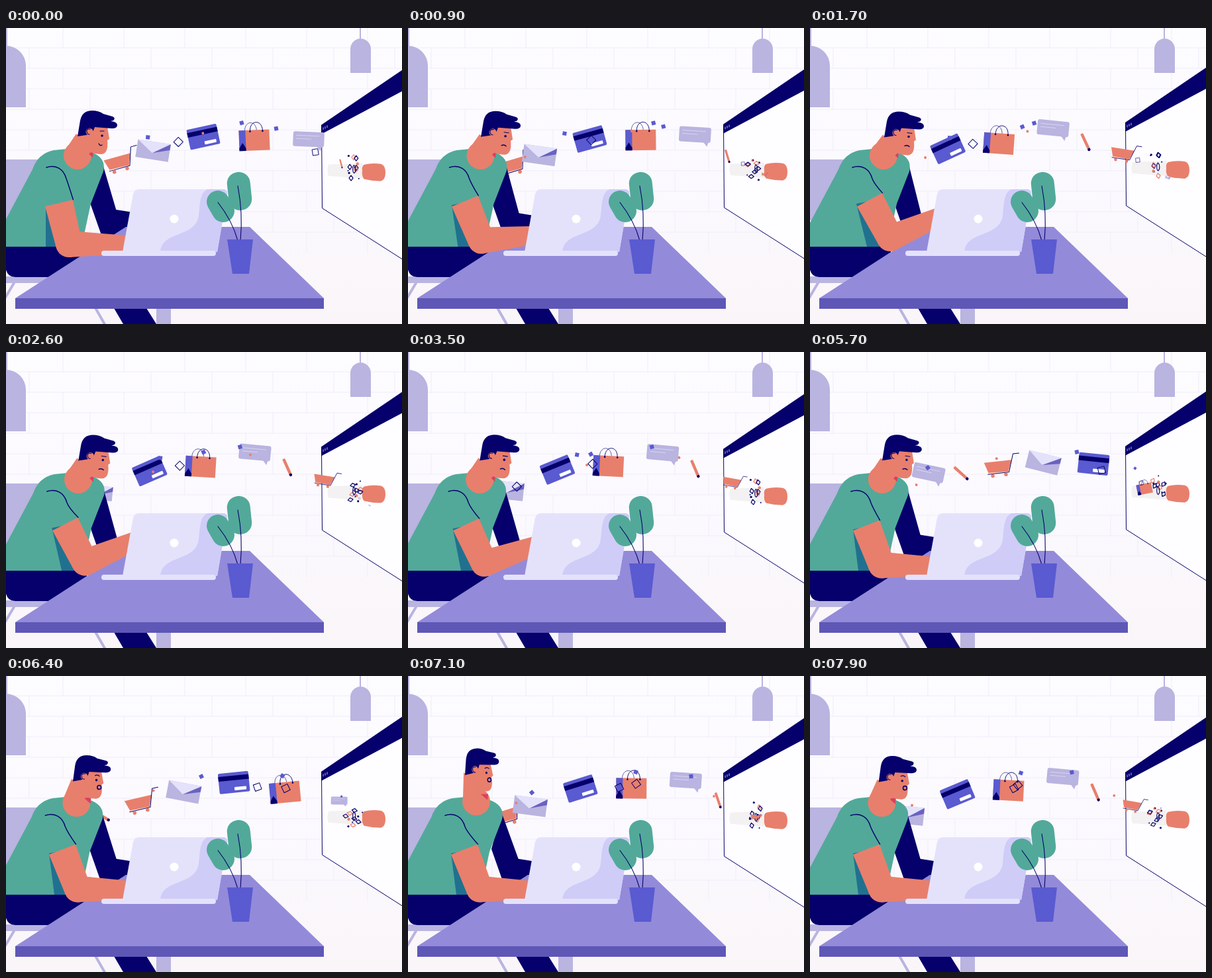
Write an HTML page with a canvas that moves like this. It is 598 px wide and 448 px high and loops after 8 s.

```html
<!DOCTYPE html>
<html lang="en">
<head>
<meta charset="utf-8">
<title>Online shopping at the desk</title>
<style>
html, body { margin: 0; width: 100%; height: 100%; overflow: hidden; background: #fcfbff; }
canvas { display: block; }
</style>
</head>
<body>
<canvas id="stage" width="598" height="448"></canvas>
<script>
const ctx = document.getElementById('stage').getContext('2d');
const LOOP = 8, STEP = .1;          // seconds
const SPEED = 463, RING = 408;      // px per second, length of one train of items
const TAU = Math.PI * 2;
const C = {
  navy: '#05006b', coral: '#e87f6c', teal: '#52a999', lilac: '#b9b4e0', pale: '#e4e2fb',
  shade: '#cfccf8', blue: '#5a5ad1', table: '#938bd9', front: '#5e57b6', white: '#fff'
};

const clamp = v => Math.max(0, Math.min(1, v));
const smooth = v => { v = clamp(v); return v * v * (3 - 2 * v); };

// Motion rules
const shake = t => -2.2 * (1 - Math.cos(TAU * (t - .3) / 3.5));
const nod = t => .5 + .5 * Math.cos(TAU * (t - 1.65) / 3.1);
const lookUp = t => Math.exp(-(((t - 7.15) / .7) ** 2));
const armLift = t => smooth(t / 1.6) * (1 - .5 * smooth((t - 1.7) / 3.8));
const trainX = t => 237 + SPEED * t + 61 * clamp(1 - t / 1.7);
const arcY = x => 164 + (x - 360) ** 2 * (x < 360 ? .00095 : .0018);
const wrap = x => 110 + (((x - 110) % RING) + RING) % RING;
const size = x => clamp((x - 128) / 16) * clamp(1 - (x - 455) / 100);

function randomizer(seed) {
  return () => (seed = (seed * 16807) % 2147483647) / 2147483647;
}

// Drawing helpers
function fill(d, color) { ctx.fillStyle = color; ctx.fill(new Path2D(d)); }
function line(d, color = C.navy, w = 1.1) {
  ctx.strokeStyle = color; ctx.lineWidth = w; ctx.lineCap = ctx.lineJoin = 'round';
  ctx.stroke(new Path2D(d));
}
function rect(x, y, w, h, color, r = 0) {
  ctx.fillStyle = color; ctx.beginPath(); ctx.roundRect(x, y, w, h, r); ctx.fill();
}
function dot(x, y, r, color) {
  ctx.fillStyle = color; ctx.beginPath(); ctx.arc(x, y, r, 0, TAU); ctx.fill();
}
function at(x, y, deg, scale, draw) {
  ctx.save(); ctx.translate(x, y); ctx.rotate(deg * Math.PI / 180); ctx.scale(scale, scale);
  draw(); ctx.restore();
}

function room() {
  const g = ctx.createLinearGradient(0, 0, 0, 448);
  g.addColorStop(0, '#fdfcff'); g.addColorStop(.6, '#fbf9fe'); g.addColorStop(1, '#faf5f8');
  ctx.fillStyle = g; ctx.fillRect(0, 0, 598, 448);
  let d = '';
  for (let row = 0; row < 11; row++) {
    const y = row * 31 - 1;
    d += `M0 ${y}H598`;
    for (let x = row % 2 ? 35 : 86; x < 598; x += 92) d += `M${x} ${y}v31`;
  }
  line(d, '#efedf9', 1);
  line('M1 0V30M535 0V18', C.lilac, 2);
  fill('M-30 120V57A30 30 0 0 1 30 57V120Z', C.lilac);
  fill('M520 68V32A15.5 16 0 0 1 551 32V68Z', C.lilac);
}

function screen(t) {
  fill('M476 147L598 64V350L478 273Z', '#fefdff');
  fill('M476 147L598 64V96L476 161Z', C.navy);
  line('M476.500 148L477.500 273L598 350', C.navy, 1);
  line('M479 151v3M482 149.500v3M485 148v3', C.lilac, 1);
  fill('M487 207L538 205V228L487 224Q484 216 487 207Z', '#f3f1f1');
  fill('M541 207Q553 204 566 206Q573 208 573 219Q573 230 566 232Q553 232 541 229Q537 226 538 216Q537 209 541 207Z', C.coral);
  crumbs(t);
}

// Crumbs circle in front of the nozzle, each at its own pace.
function crumbs(t) {
  for (let i = 0; i < 11; i++) {
    const angle = i * 2.4 + TAU * t / 3.5 * (1 + i % 3);
    const radius = 7 + i % 4 * 4.5;
    const x = 524 + Math.cos(angle) * radius * .7, y = 212 + Math.sin(angle) * radius;
    const color = i % 3 === 2 ? C.coral : C.navy;
    if (i % 2) dot(x, y, 1 + i % 3 * .6, color);
    else at(x, y, t * 100, 1, () => line('M0 -4L3 0L0 4L-3 0Z', color, 1.2));
  }
  line('M525.500 208C528 210 529 217 526 220C523 219 523 210 525.500 208');
}

const DRAW = {
  card() {
    rect(-23, -15.5, 46, 31, C.blue, 2);
    rect(-23, -10.5, 46, 7, C.navy);
    rect(0, 7, 18, 5, C.white, 1);
  },
  bag() {
    line('M-14 -15C-13 -30 3 -30 4 -15', C.navy, .6);
    rect(-23, -15, 46, 31, C.coral);
    fill('M-23 -15H-13V16H-23Z', C.blue);
    fill('M-23 16V12L-18 4L-13 12V16Z', C.navy);
    line('M-6 -14C-6 -31 13 -31 13 -14', C.navy, .9);
    dot(-6, -13, 1.3, C.navy); dot(13, -13, 1.3, C.navy);
  },
  chat() {
    rect(-24, -12, 48, 23, C.lilac, 3);
    fill('M12 9H21L19 17Z', C.lilac);
    line('M-19 -6H16M-19 -1H4', '#d8d5f0', 1);
  },
  pencil() {
    rect(-14, -2.2, 26, 4.4, C.coral, 1);
    dot(12.5, 0, 2.2, C.navy);
  },
  cart() {
    fill('M-20 -4L22 -4L15 13L-15 12Z', C.coral);
    line('M-16 14L16 14L25 -13L34 -13', C.navy, 1);
    dot(-9, 17, 2.8, C.coral); dot(11, 17, 2.8, C.coral);
  },
  mail() {
    rect(-25, -14, 50, 27, C.lilac);
    fill('M25 -14L0 3L25 -5Z', '#6a62bf');
    fill('M-25 -14H25L-1 3Z', C.pale);
  },
  solid() { rect(-3, -3, 6, 6, C.blue); },
  hollow() { line('M-5 -5H5V5H-5Z', C.navy, 1); },
  red() { dot(0, 0, 2, C.coral); }
};

// off: place in the train, lift: height from the arc, rot: angle at x = 300,
// turn: degrees per px, lag: how far it trails when leaving the head
const ITEMS = [
  { kind: 'cart', off: -145, lift: 0, rot: -5, turn: .08, lag: .4 },
  { kind: 'mail', off: -76, lift: 4, rot: 12, turn: .04, lag: 0 },
  { kind: 'card', off: 0, lift: -3, rot: -12, turn: .14, lag: 0 },
  { kind: 'bag', off: 77, lift: 5, rot: 3, turn: -.07, lag: 0 },
  { kind: 'chat', off: 159, lift: -12, rot: 8, turn: -.035, lag: 0 },
  { kind: 'pencil', off: 208, lift: 3, rot: 51, turn: .12, lag: 0 }
];

const rnd = randomizer(77);
const BITS = Array.from({ length: 7 }, (_, i) => ({
  kind: ['solid', 'hollow', 'red'][i % 3],
  start: i * RING / 7 + rnd() * 40,
  pace: .9 + rnd() * .2,
  lift: -24 + rnd() * 44,
  rot: rnd() * 90
}));

// An item shrinking away on the right overlaps its next round on the left.
function repeat(x, draw) {
  for (const px of [x, x + RING]) draw(px);
}

function stream(t) {
  const base = trainX(t);
  for (const it of ITEMS) {
    repeat(wrap(base + it.off), x => {
      const px = x + Math.max(0, 190 - x) * it.lag;
      at(px, arcY(px) + it.lift, it.rot + it.turn * (px - 300), size(px), DRAW[it.kind]);
    });
  }
  for (const b of BITS) {
    repeat(wrap(b.start + SPEED * b.pace * t), x =>
      at(x, arcY(x) + b.lift, b.rot + x * .12, size(x), DRAW[b.kind]));
  }
}

function limb(x1, y1, r1, x2, y2, r2) {
  const a = Math.atan2(y2 - y1, x2 - x1), s = Math.sin(a), c = Math.cos(a);
  fill(`M${x1 + s * r1} ${y1 - c * r1}L${x2 + s * r2} ${y2 - c * r2}` +
       `L${x2 - s * r2} ${y2 + c * r2}L${x1 - s * r1} ${y1 + c * r1}Z`, C.coral);
}

function face(t) {
  fill('M112 158L122 147L153 149L156 168L153 170Q155 190 144 191Q135 191 128 188L122 194L104 188Z', C.coral);
  fill('M108 164L112 140Q115 125 130 125Q140 125 147 130L161 134Q166 136 162 140L158 141Q168 142 168 147Q168 152 160 152L134 150Q131 161 121 162Z', C.navy);
  dot(126, 157, 5.5, C.coral);
  line('M127.500 153Q121 152 122 157Q122.500 161 126 161');
  dot(145, 163, 1.8, C.navy);
  if (t < .9) {
    line('M142 156H148');
    line('M140 175Q142 179 145 177', C.navy, 1.4);
  } else if (t < 6.4) {
    line('M143 157L150 158');
    line('M139 177Q143 175 146 178', C.navy, 1.4);
  } else {
    line('M143 156Q147 154 150 157');
    line('M146 174a3 3 0 1 0 6 0a3 3 0 1 0 -6 0', C.navy, 1.6);
  }
}

function head(t, sway) {
  const up = lookUp(t), n = nod(t) * (1 - up);
  const x = 4 * n - 22 * up, y = 1.5 * n - 14 * up;
  const nx = sway, ny = -3 * up;
  dot(108 + nx, 193 + ny, 21, C.coral);
  fill(`M${106 + x} ${160 + y}L${88 + nx} ${187 + ny}L${110 + nx} ${213 + ny}` +
       `L${129 + nx} ${194 + ny}L${132 + x} ${184 + y}Z`, C.coral);
  at(126 + x * .5, 188 + y * .6, 0, 1, () => fill('M-5 -1L6 -1L5 8Z', '#d9415f'));
  ctx.save();
  ctx.translate(108 + x, 165 + y);
  ctx.rotate(-.08 * up);
  ctx.scale(1 - .12 * up, 1);
  ctx.translate(-108, -165);
  face(t);
  ctx.restore();
}

function chair() {
  rect(-10, 199, 90, 92, C.lilac, 3);
  fill('M0 376H66V386H0Z', C.lilac);
  line('M12 386L-1 408M134 422L150 450', C.lilac, 4);
  rect(227, 424, 22, 24, C.lilac);
  fill('M163 424H212L227 448H177Z', C.navy);
}

function armPose(t) {
  const u = armLift(t), up = smooth((u - .4) / .5);
  return {
    cx: 80 + 10 * u, cy: 265 - 5 * u,
    ex: 95 + 26 * u, ey: 327 - 9 * u,
    hx: 182 + 12 * up, hy: 328 - 42 * up,
    farY: 275 + 16 * up
  };
}

function man(t, arm, sway) {
  const { cx, cy, ex, ey, farY } = arm;
  const fx = 166 + (farY - 274) / 4;
  fill(`M${146 + sway} 206L${fx} ${farY}L192 ${farY + 4}V316L146 319L126 262Z`, C.navy);
  fill('M0 330H122V377H14Q3 377 0 366Z', C.navy);
  at(sway, 0, 0, 1, () => fill(
    'M-9 331V306L40 214Q48 190 72 185L92 183L126 187Q152 195 147 217L128 266L114 331Z', C.teal));
  fill(`M${cx - 20} ${cy + 6}L${cx + 10} ${cy}L${ex + 4} 331H${ex - 35}Z`, '#20718f');
  head(t, sway);
  limb(cx, cy, 21.5, ex, ey, 20);
}

function sleeve({ cx, cy, ex, ey }, sway) {
  const a = Math.atan2(ey - cy, ex - cx);
  const x = cx + Math.sin(a) * 22, y = cy - Math.cos(a) * 22;
  line(`M${61 + sway} 211C${76 + sway} 206 ${87 + sway} 214 ${91 + sway} 228Q${94 + sway} 236 ${x} ${y}`, C.navy, 1.4);
}

function desk() {
  fill('M14 409L181 301H368L480 409Z', C.table);
  rect(14, 409, 466, 16, C.front);
}

function laptop() {
  fill('M176 339L192 251Q194 244 201 244H327Q335 244 334 251L319 339Z', C.pale);
  fill('M305 244H327Q335 244 334 251L319 339H233C236 306 286 318 291 284C293 268 292 248 305 244Z', C.shade);
  rect(144, 337, 173, 8, C.pale, 4);
  dot(254, 289, 6.5, C.white);
}

function plant() {
  at(352, 247, -6, 1, () => rect(-17, -29, 35, 58, C.teal, 17));
  at(324, 270, -30, 1, () => rect(-17, -25, 34, 50, C.teal, 17));
  line('M350 239Q358 280 354 322M320 264Q342 292 350 322');
  fill('M334 320H373L367 372H342Z', C.blue);
}

function frame(t) {
  const arm = armPose(t);
  const sway = 3 * nod(t) * (1 - lookUp(t)) - 5 * lookUp(t);
  room();
  at(0, shake(t), 0, 1, () => screen(t));
  chair();
  stream(t);
  man(t, arm, sway);
  desk();
  // The near forearm rests over the desk, behind the laptop.
  dot(arm.ex, arm.ey, 20, C.coral);
  limb(arm.ex, arm.ey, 20, arm.hx, arm.hy, 14);
  sleeve(arm, sway);
  laptop();
  plant();
}

const start = performance.now();
function tick() {
  const t = (performance.now() - start) / 1000 % LOOP;
  frame(Math.floor(t / STEP + 1e-6) * STEP);
  requestAnimationFrame(tick);
}
tick();
</script>
</body>
</html>
```
